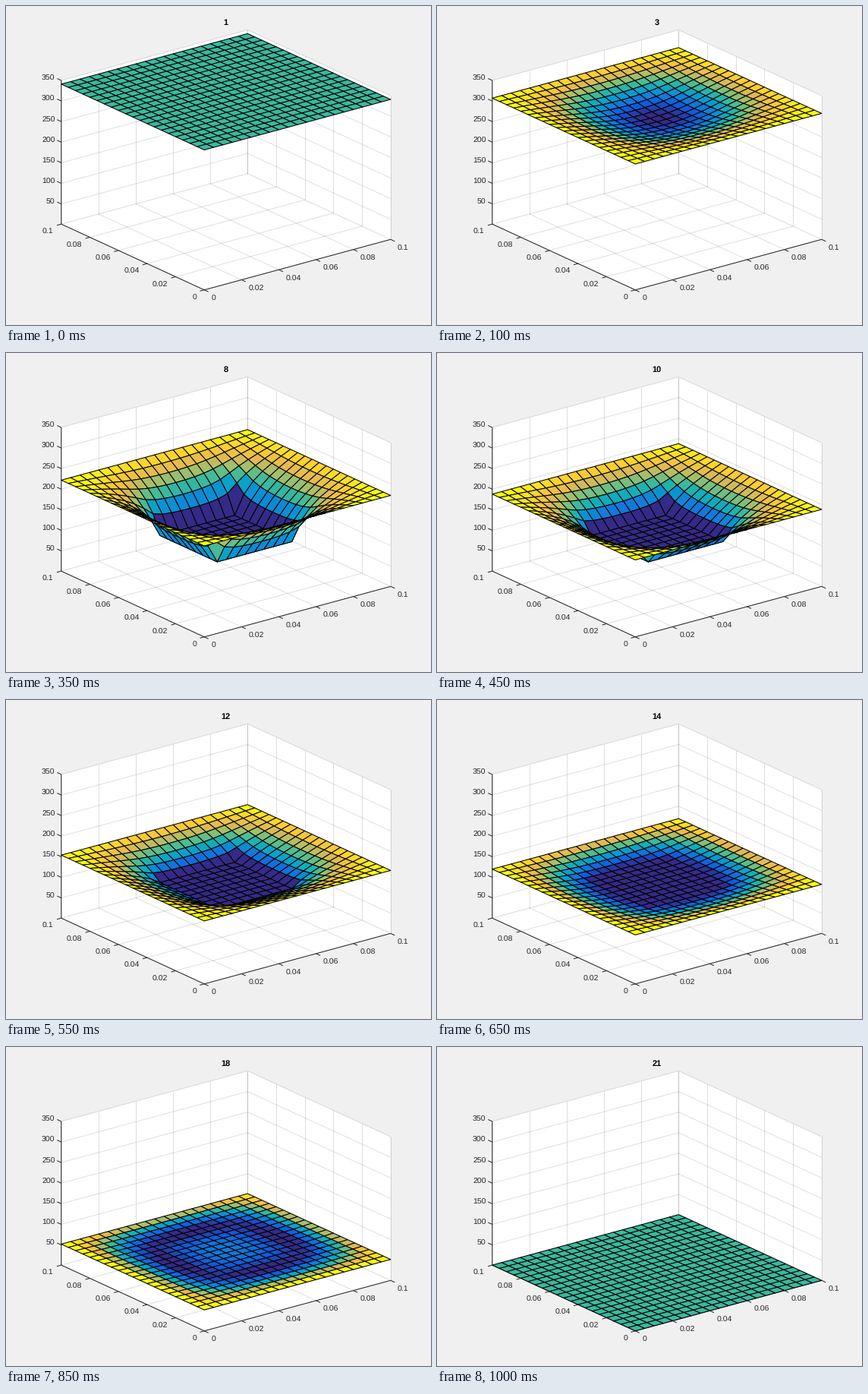
These frames come from a looping animation (560x420 px, 1.05 s). A matplotlib script:

```python
import numpy as np
import matplotlib.pyplot as plt
from matplotlib.animation import FuncAnimation
from matplotlib.collections import PolyCollection
from matplotlib.colors import LinearSegmentedColormap

plt.rcParams["text.hinting"] = "none"
plt.rcParams["font.family"] = "Liberation Sans"

W, H, DPI = 560, 420, 100
PX = 72 / DPI                      # one pixel in points
N = 20                             # cells per side
LOW, HIGH = 1, 350                 # z limits
HOT, COLD, BLOCK = 341, 1, 98.5
INK = "#262626"
CMAP = LinearSegmentedColormap.from_list(
    "heat", "#352a87 #0f5cdd #127dd8 #079ccf #15b1b4 "
            "#59bd8c #a5be6b #e1b952 #fcce2e #f9fb0e".split(), N=64)

# Orthographic view of a unit cube, stretched to fill the axes box
AZ, EL = np.radians([37.5, 30])
LEFT, RIGHT, TOP, BOTTOM = .13 * W, .905 * W, .075 * H, .89 * H
ACROSS = np.array([np.cos(AZ), -np.sin(AZ), 0])
UP = np.array([np.sin(AZ) * np.sin(EL), np.cos(AZ) * np.sin(EL), np.cos(EL)])
ACROSS *= (RIGHT - LEFT) / np.abs(ACROSS).sum()
UP *= (BOTTOM - TOP) / UP.sum()


def project(p):
    """Points in the unit cube to stage pixels."""
    p = np.asarray(p, float)
    return np.stack([LEFT - ACROSS[1] + p @ ACROSS, BOTTOM - p @ UP], axis=-1)


def height(z):
    return (z - LOW) / (HIGH - LOW)


def solve():
    """Steady heat in a cube with linear walls and a cool block inside."""
    u = np.tile(np.linspace(HOT, COLD, N + 1), (N + 1, N + 1, 1))
    core = (slice(6, 15),) * 3
    mid, ahead, back = slice(1, -1), slice(2, None), slice(None, -2)
    for _ in range(1500):
        u[core] = BLOCK
        u[mid, mid, mid] = (u[ahead, mid, mid] + u[back, mid, mid]
                            + u[mid, ahead, mid] + u[mid, back, mid]
                            + u[mid, mid, ahead] + u[mid, mid, back]) / 6
    u[core] = BLOCK
    return u


fig = plt.figure(figsize=(W / DPI, H / DPI), dpi=DPI, facecolor="#f0f0f0")
ax = fig.add_axes([0, 0, 1, 1])
ax.set_xlim(0, W)
ax.set_ylim(H, 0)
ax.axis("off")


def stroke(xy, **kw):
    ax.plot(*np.transpose(xy), color=INK, lw=PX, solid_capstyle="butt", **kw)


def grid(*pts):
    stroke(project(pts), alpha=.15, zorder=1)


def label(x, y, s, ha, size=10.5, **kw):
    return ax.text(x, y + .36 * size, s, ha=ha, va="baseline",
                   fontsize=size * PX, **kw)


def tick(pos, out, pad, s):
    """Tick at pos pointing along the cube direction out, with its label."""
    start = project(pos)
    step = project(np.add(pos, out)) - start
    end = start + 6 * step / np.hypot(*step)
    stroke([start, end], zorder=2)
    label(*(end + pad), s, "left" if pad[0] > 0 else "right", color=INK)


# Floor and back walls: unit squares with one coordinate held
square = np.array([(0, 0), (1, 0), (1, 1), (0, 1)])
for axis, level in enumerate((1, 1, 0)):
    ax.fill(*project(np.insert(square, axis, level, axis=1)).T,
            color="white", lw=0, zorder=0)

for t in np.linspace(0, 1, 6):
    text = f"{t / 10:.2g}"
    grid((t, 0, 0), (t, 1, 0))
    grid((t, 1, 0), (t, 1, 1))
    grid((0, t, 0), (1, t, 0))
    grid((1, t, 0), (1, t, 1))
    tick((t, 0, 0), (0, -1, 0), (3.6, 8.2), text)
    tick((0, t, 0), (-1, 0, 0), (-4.4, 7.8), text)
for z in range(50, HIGH + 1, 50):
    h = height(z)
    grid((0, 1, h), (1, 1, h), (1, 0, h))
    tick((0, 1, h), (0, 1, 0), (-2.8, -1), str(z))
stroke(project([(0, 1, 1), (0, 1, 0), (0, 0, 0), (1, 0, 0)]), zorder=2)

title = label((LEFT + RIGHT) / 2, 21, "", "center", 11,
              weight="bold", color="black")

heat = solve()
gx, gy = np.indices((N + 1, N + 1)) / N
# Cells from back to front
ci, cj = (m.ravel()[::-1] for m in np.indices((N, N)))
surf = PolyCollection([], edgecolors="black", linewidths=1.05 * PX,
                      joinstyle="round", zorder=3)
ax.add_collection(surf, autolim=False)


def update(k):
    z = heat[:, :, k]
    p = project(np.stack([gx, gy, height(z)], axis=-1))
    surf.set_verts(np.stack([p[ci + a, cj + b] for a, b in square], axis=1))
    span = np.ptp(z)
    shade = (z - z.min()) / span if span > 1e-6 else np.full_like(z, .5)
    surf.set_facecolor(CMAP(shade[ci, cj]))
    title.set_text(str(k + 1))
    return surf, title


anim = FuncAnimation(fig, update, frames=N + 1, interval=50,
                     init_func=lambda: update(0), repeat=True,
                     repeat_delay=0, blit=False)
plt.show()
```
